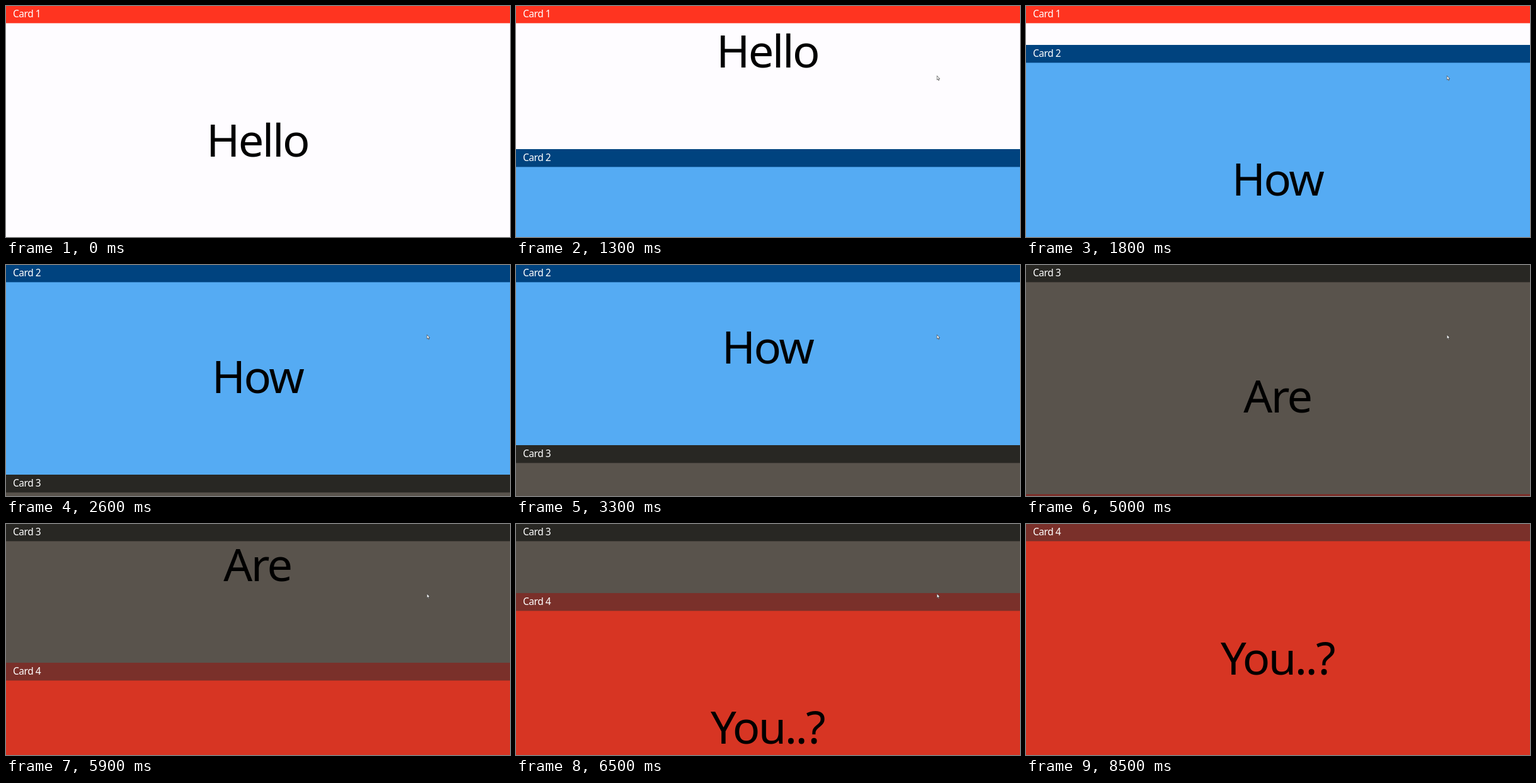
Recreate the animation shown at these times as an HTML page. Size 800 by 368 pixels, loop 9.9 s.

```html
<!DOCTYPE html>
<html lang="en">
<head>
<meta charset="utf-8">
<title>Sticky cards</title>
<style>
  html, body { margin: 0; width: 100%; height: 100%; overflow: hidden; }
  #stage {
    position: relative; width: 800px; height: 368px; overflow: hidden;
    font-family: "Noto Sans", "Open Sans", sans-serif;
    letter-spacing: -0.035em;
    background: #fefcff;
  }
  .card { position: absolute; left: 0; top: 0; width: 800px; height: 370px; background: var(--body); }
  .card header {
    position: absolute; z-index: 1; left: 0; top: 0; width: 800px; height: 28px;
    padding-left: 11px; box-sizing: border-box;
    font-size: 15.5px; font-weight: 500; line-height: 26px; letter-spacing: -0.03em;
    color: #fff; background: var(--head);
    box-shadow: 0 1px color-mix(in srgb, var(--head) 40%, transparent);
  }
  .card p {
    position: absolute; left: -1px; top: 162px; width: 800px; margin: 0;
    font-size: 72px; line-height: 100px; letter-spacing: -0.035em;
    text-align: center; color: #000;
  }
  #cursor { position: absolute; left: 0; top: 0; width: 8px; height: 11px; }
</style>
</head>
<body>
<div id="stage">
  <section class="card" style="--head:#ff3420;--body:#fefcff"><header>Card 1</header><p>Hello</p></section>
  <section class="card" style="--head:#00437f;--body:#55abf3"><header>Card 2</header><p>How</p></section>
  <section class="card" style="--head:#282723;--body:#59534c"><header>Card 3</header><p>Are</p></section>
  <section class="card" style="--head:#7a302a;--body:#d73523"><header>Card 4</header><p>You..?</p></section>
  <svg id="cursor" viewBox="0 0 8 11">
    <path d="M.6 .6V7.2L2.1 5.9L3.1 8.2L4.2 7.7L3.2 5.5H5.2Z" fill="#fff" stroke="#333" stroke-width=".7"/>
  </svg>
</div>
<script>
  const LOOP = 9900, TICK = 100, CARD = 370, HEAD = 28;

  // Each flick of the wheel: start ms, end ms, scroll offset reached
  const flicks = [
    [900, 2000, 326],
    [2100, 2600, 406],
    [3100, 3500, 481],
    [3600, 4100, 650],
    [4200, 4800, 745],
    [5400, 6500, 1000],
    [6600, 6900, 1110]
  ];

  const cards = [...document.querySelectorAll('.card')];
  const heads = cards.map(card => card.querySelector('header'));
  const cursor = document.getElementById('cursor');

  // Smoothstep that picks up speed early and settles slowly.
  function ease(u) {
    const x = Math.min(1, Math.max(0, u)) ** 0.775;
    return x * x * (3 - 2 * x);
  }

  const scrollAt = t => flicks.reduce(
    (y, [start, end, to]) => y + (to - y) * ease((t - start) / (end - start)), 0);

  const place = (el, x, y) => { el.style.transform = `translate(${x}px, ${y}px)`; };

  function render(now) {
    const t = Math.floor(now % LOOP / TICK) * TICK;
    const scroll = Math.round(scrollAt(t));
    cards.forEach((card, i) => {
      const top = i * CARD - scroll;
      place(card, 0, top);
      // Headers stick to the top until the next card pushes them out.
      place(heads[i], 0, top <= 0 ? Math.min(-1 - top, CARD - HEAD) : 0);
    });
    cursor.style.visibility = t >= 100 && t < 8500 ? 'visible' : 'hidden';
    if (t < 200) place(cursor, 713, 81);
    else place(cursor, 667.5, 110.5);
  }

  function loop() {
    render(performance.now());
    requestAnimationFrame(loop);
  }
  loop();
</script>
</body>
</html>
```
